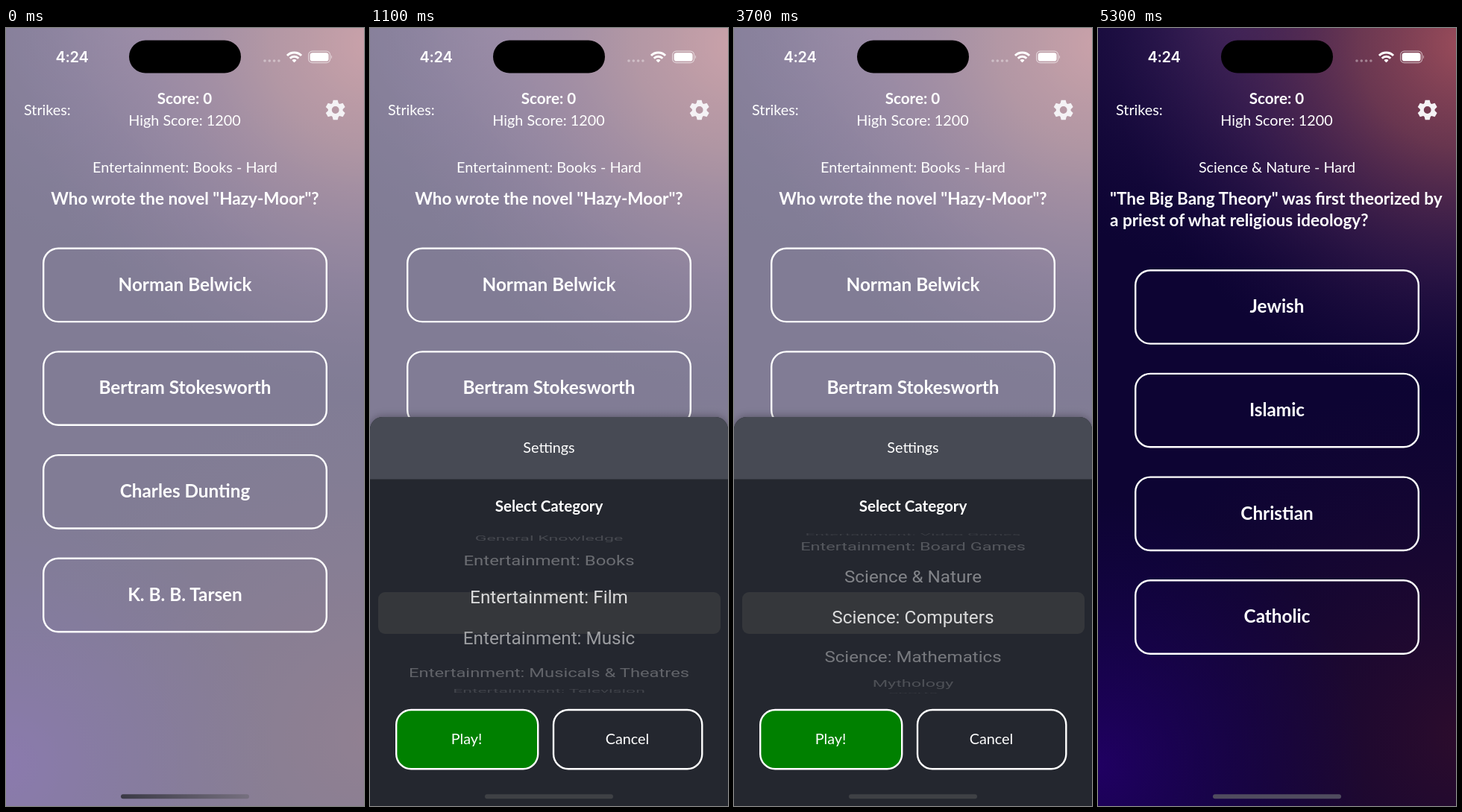
Recreate the animation shown at these times as an HTML page. Size 480x1044 px, loop 8000 ms.

```html
<!DOCTYPE html>
<html lang="en">
<head>
<meta charset="utf-8">
<title>Trivia quiz</title>
<style>
  html, body { margin: 0; width: 100%; height: 100%; overflow: hidden; background: #0d0433; }
  svg { display: block; width: 100vw; height: 100vh; }
  text { fill: #fff; font: 400 19.8px Lato, "Open Sans", sans-serif; text-anchor: middle; }
  .bold { font-weight: 700; font-size: 20.6px; }
  .question { font-weight: 700; font-size: 22.5px; }
  .answer { font-weight: 700; font-size: 24.3px; }
  .clock { font: 600 20px Inter, Roboto, sans-serif; letter-spacing: -.3px; }
  .row { font: 400 24.4px Roboto, "Liberation Sans", sans-serif; }
  .start { text-anchor: start; }
  .box { fill: none; stroke: #fff; stroke-width: 2.4; }
  #sheet { filter: drop-shadow(0 0 6px rgba(0, 0, 0, .35)); }
</style>
</head>
<body>
<svg viewBox="0 0 480 1044" preserveAspectRatio="none">
  <defs>
    <radialGradient id="salmon" gradientUnits="userSpaceOnUse" cx="490" cy="20" r="470">
      <stop offset="0" stop-color="#9a4c5a"/>
      <stop offset=".3" stop-color="#864658" stop-opacity=".75"/>
      <stop offset=".65" stop-color="#5c3060" stop-opacity=".38"/>
      <stop offset="1" stop-color="#2c1450" stop-opacity="0"/>
    </radialGradient>
    <radialGradient id="plum" gradientUnits="userSpaceOnUse" cx="170" cy="-20" r="340">
      <stop offset="0" stop-color="#3c2459" stop-opacity=".85"/>
      <stop offset="1" stop-color="#1c0c46" stop-opacity="0"/>
    </radialGradient>
    <radialGradient id="violet" gradientUnits="userSpaceOnUse" cx="0" cy="990" r="360">
      <stop offset="0" stop-color="#200062"/>
      <stop offset="1" stop-color="#180350" stop-opacity="0"/>
    </radialGradient>
    <radialGradient id="wine" gradientUnits="userSpaceOnUse" cx="490" cy="950" r="480">
      <stop offset="0" stop-color="#2c0c2c"/>
      <stop offset="1" stop-color="#1a0832" stop-opacity="0"/>
    </radialGradient>
    <linearGradient id="bar">
      <stop offset="0" stop-color="#3a3945"/>
      <stop offset="1" stop-color="#76707f"/>
    </linearGradient>
  </defs>

  <rect width="480" height="1044" fill="#0d0433"/>
  <rect width="480" height="1044" fill="url(#plum)"/>
  <rect width="480" height="1044" fill="url(#salmon)"/>
  <rect width="480" height="1044" fill="url(#wine)"/>
  <rect width="480" height="1044" fill="url(#violet)"/>
  <rect id="veil" width="480" height="1044" fill="#fff"/>

  <text class="start" x="24" y="116.5">Strikes:</text>
  <text class="bold" x="239.5" y="102">Score: 0</text>
  <text x="239.5" y="131">High Score: 1200</text>
  <g id="gear" transform="translate(441.7 110)" fill="#f4f2f5">
    <circle r="7.4" fill="none" stroke="#f4f2f5" stroke-width="5"/>
  </g>

  <g id="first">
    <text x="240" y="194">Entertainment: Books - Hard</text>
    <text class="question" x="240" y="237">Who wrote the novel "Hazy-Moor"?</text>
  </g>
  <g id="second">
    <text x="240" y="194">Science &amp; Nature - Hard</text>
    <text class="question start" x="16" y="237">"The Big Bang Theory" was first theorized by</text>
    <text class="question start" x="16" y="266">a priest of what religious ideology?</text>
  </g>

  <g id="sheet">
    <path d="M0 540V17a17 17 0 0 1 17-17H463a17 17 0 0 1 17 17V540z" fill="#24272f"/>
    <path d="M0 83.5V17a17 17 0 0 1 17-17H463a17 17 0 0 1 17 17V83.5z" fill="#474a54"/>
    <text x="240" y="48">Settings</text>
    <text class="bold" x="240" y="127">Select Category</text>
    <rect x="11" y="235" width="459" height="56" rx="9" fill="#35373b"/>
    <g id="wheel"></g>
    <rect class="box" x="35.2" y="393" width="190" height="79.3" rx="20" style="fill:#008000"/>
    <rect class="box" x="246" y="393" width="199.3" height="79.3" rx="20"/>
    <text x="129.5" y="439">Play!</text>
    <text x="345" y="439">Cancel</text>
  </g>

  <text class="clock" x="88.5" y="46">4:24</text>
  <rect x="165" y="16.5" width="150" height="44" rx="22"/>
  <g fill="#fff" opacity=".38">
    <circle cx="347" cy="44" r="1.8"/><circle cx="353.3" cy="44" r="1.8"/>
    <circle cx="359.6" cy="44" r="1.8"/><circle cx="365.9" cy="44" r="1.8"/>
  </g>
  <g id="wifi" transform="translate(386.5 46.3)" fill="none" stroke="#fff" stroke-width="3"></g>
  <rect x="405.6" y="31.2" width="29" height="15.4" rx="5" fill="none" stroke="#fff" stroke-width="1.2" opacity=".55"/>
  <rect x="407.6" y="33.2" width="25" height="11.4" rx="3.4" fill="#fff"/>
  <path d="M436 36.3q2.2 2.6 0 5.2z" fill="#fff" opacity=".55"/>
  <rect id="home" x="154" y="1028.3" width="172" height="6" rx="3"/>
</svg>

<script>
const LOOP = 8000, STEP = 100;
const OPEN_Y = 522, CLOSED_Y = 1060;
const VEIL = 0.48;
const QUESTION_AT = 5000;

const $ = id => document.getElementById(id);
const clamp = v => Math.min(1, Math.max(0, v));
const easeOut = (u, power) => 1 - (1 - clamp(u)) ** power;

function add(parent, tag, attrs, label = "") {
  const el = document.createElementNS("http://www.w3.org/2000/svg", tag);
  for (const key in attrs) el.setAttribute(key, attrs[key]);
  el.textContent = label;
  parent.appendChild(el);
  return el;
}

// Linear interpolation through [x, y] points
function along(points, x) {
  let [x0, y0] = points[0];
  if (x <= x0) return y0;
  for (const [x1, y1] of points) {
    if (x < x1) return y0 + (y1 - y0) * (x - x0) / (x1 - x0);
    [x0, y0] = [x1, y1];
  }
  return y0;
}

function addAnswers(group, labels, top) {
  labels.forEach((label, i) => {
    const y = top + i * 138.7;
    add(group, "rect", { class: "box", x: 50.2, y, width: 379.6, height: 98.4, rx: 20 });
    add(group, "text", { class: "answer", x: 240, y: y + 57 }, label);
  });
}
addAnswers($("first"), ["Norman Belwick", "Bertram Stokesworth", "Charles Dunting", "K. B. B. Tarsen"], 295.7);
addAnswers($("second"), ["Jewish", "Islamic", "Christian", "Catholic"], 325.2);

for (let i = 0; i < 6; i++) {
  add($("gear"), "path", { d: "M-4.6-7L-3-13.2H3L4.6-7z", transform: `rotate(${i * 60})` });
}

for (const r of [2.2, 8, 13.3]) {
  const x = r * Math.sin(0.8), y = -r * Math.cos(0.8);
  add($("wifi"), "path", { d: `M${-x} ${y}A${r} ${r} 0 0 1 ${x} ${y}` });
}
add($("wifi"), "path", { d: "M0 0L-3-3.4Q0-5.4 3-3.4z", fill: "#fff", stroke: "none" });

const shows = names => names.map(name => "Entertainment: " + name);
const rows = [
  "General Knowledge",
  ...shows(["Books", "Film", "Music", "Musicals & Theatres", "Television", "Video Games", "Board Games"]),
  "Science & Nature", "Science: Computers", "Science: Mathematics", "Mythology", "Sports"
].map(label => add($("wheel"), "text", { class: "row", y: 8.7 }, label));

// Each flick: start, end, index it settles on
const flicks = [
  [1000, 1500, 4], [1600, 1900, 5], [2100, 2400, 6],
  [2500, 2800, 7], [3500, 3800, 9], [3900, 4300, 8]
];

function wheelIndex(t) {
  let pos = 1;
  for (const [start, end, to] of flicks) {
    if (t > start) pos += (to - pos) * easeOut((t - start) / (end - start), 2.8);
  }
  return pos;
}

const ROW_ANGLE = 27.9 * Math.PI / 180, RADIUS = 115.5, DEPTH = 0.00076;
const fade = [[0, .82], [.41, .82], [.58, .55], [1, .4], [2, .2], [3, .09]];

function drawWheel(pos) {
  rows.forEach((row, i) => {
    const angle = (i - pos) * ROW_ANGLE;
    const shown = Math.abs(angle) < 1.54;
    row.style.display = shown ? "" : "none";
    if (!shown) return;
    const cos = Math.cos(angle);
    const scale = 1 / (1 + DEPTH * RADIUS * (1 - cos));
    const y = 263.5 + RADIUS * Math.sin(angle) * scale;
    row.setAttribute("transform", `translate(240 ${y}) scale(${scale} ${scale * cos})`);
    row.style.opacity = along(fade, Math.abs(i - pos));
  });
}

function sheetY(t) {
  if (t <= 0 || t >= 4900) return CLOSED_Y;
  if (t <= 4600) return 1044 - (1044 - OPEN_Y) * easeOut(t / 500, 4);
  return along([[4600, OPEN_Y], [4700, 690], [4800, 940], [4900, CLOSED_Y]], t);
}

function draw(time) {
  const t = Math.floor(time / STEP) * STEP;
  const y = sheetY(t);
  const veil = along([[4600, VEIL], [4700, .32], [4800, .12], [4900, 0]], t);
  const next = t >= QUESTION_AT;

  $("veil").setAttribute("opacity", veil);
  $("first").style.display = next ? "none" : "";
  $("second").style.display = next ? "" : "none";
  $("sheet").style.display = y >= 1044 ? "none" : "";
  $("sheet").setAttribute("transform", `translate(0 ${y})`);
  drawWheel(wheelIndex(t));
  $("home").setAttribute("fill", y < 1020 ? "#3f4145" : t < 4600 ? "url(#bar)" : "#504c5f");
}

const begin = performance.now();
function tick() {
  draw((performance.now() - begin) % LOOP);
  requestAnimationFrame(tick);
}
tick();
</script>
</body>
</html>
```
